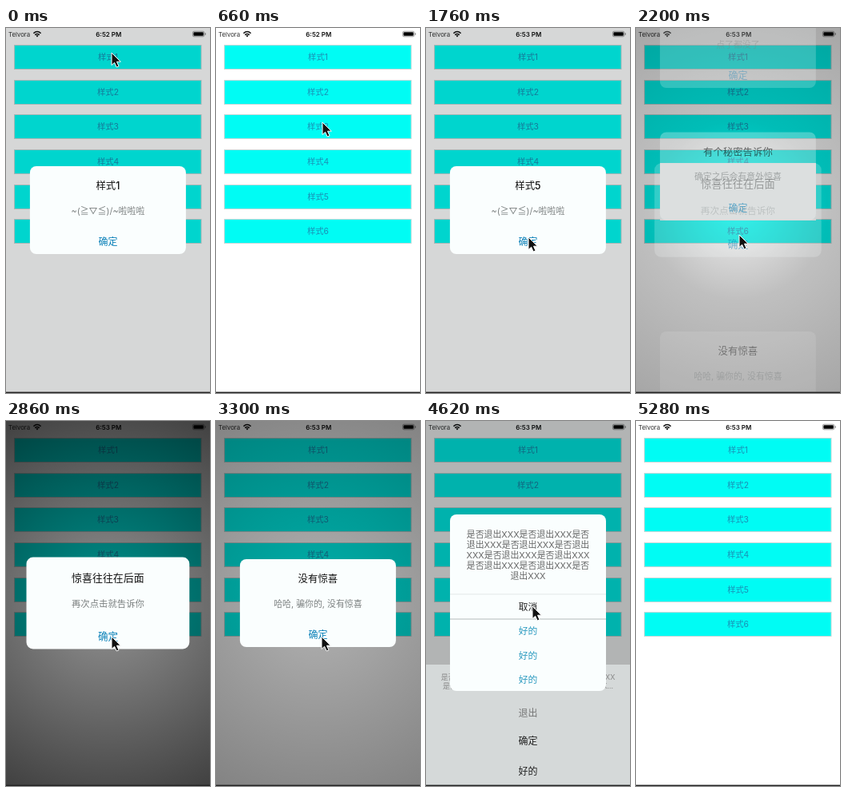
Animation of 255x457 px, one loop 5.5 s. Source, as an HTML page:

```html
<!DOCTYPE html>
<html lang="zh">
<head>
<meta charset="utf-8">
<style>
html, body { margin: 0; width: 100%; height: 100%; overflow: hidden; background: #fff; }
svg { display: block; width: 100vw; height: 100vh; font-family: Inter, "Noto Sans CJK SC", "Noto Sans CJK", sans-serif; }
</style>
</head>
<body>
<svg id="stage" viewBox="0 0 255 457"></svg>
<script>
const STEP = 220, COUNT = 25, BLUE = '#0a80b8', PANEL = '#fafefe', SHADE = '#d5d9d9';

const rect = (x, y, w, h, fill, more = '') =>
  `<rect x="${x}" y="${y}" width="${w}" height="${h}" fill="${fill}" ${more}/>`;

// y is the middle of the glyphs
const text = (s, x, y, size, fill, more = 'text-anchor="middle"') =>
  `<text x="${x}" y="${y + size * 0.38}" font-size="${size}" fill="${fill}" ${more}>${s}</text>`;

const statusBar = step =>
  text('Telvora', 3, 7.6, 7.8, '#333', '') +
  `<g fill="none" stroke="#111" stroke-width="1.4"><path d="M34.4 6.6q4.6-4 9.2 0M36.2 8.6q2.8-2.4 5.6 0"/></g>
   <path d="M37.4 9.6q1.6-1.2 3.2 0L39 11.4z"/>` +
  text(step < 8 ? '6:52 PM' : '6:53 PM', 128.3, 7.6, 8, '#111', 'text-anchor="middle" font-weight="600"') +
  rect(233.4, 4.2, 14.4, 6.6, 'none', 'rx="1.6" stroke="#777" stroke-width=".7"') +
  rect(234.4, 5.2, 12.4, 4.6, '#000', 'rx=".8"') + rect(248.6, 6.2, 1, 2.6, '#777');

function page(step) {
  let out = rect(0, 0, 255, 457, '#fff') + statusBar(step);
  for (let i = 0; i < 6; i++) {
    const y = Math.ceil(21.8 + i * 43.6);
    out += rect(10.5, y - .5, 233.5, 30, '#00fcf4', 'stroke="#c4d8d8"') +
      text('样式' + (i + 1), 127.5, y + 14.5, 10.3, '#1a8fb5');
  }
  return out;
}

const dim = a => rect(0, 0, 255, 457, '#000808', `opacity="${a}"`);

const vignette = (inner, outer, mid = inner * .6 + outer * .4) =>
  `<radialGradient id="v" gradientUnits="userSpaceOnUse" cx="127.5" cy="228" r="280">
   <stop stop-opacity="${inner}"/><stop offset=".4" stop-opacity="${mid}"/>
   <stop offset="1" stop-opacity="${outer}"/></radialGradient>` +
  rect(0, 0, 255, 457, 'url(#v)');

const alertBox = (title, msg, { y = 228, scale = 1, panel = 1, ink = 1 } = {}) =>
  `<g transform="translate(127.4 ${y}) scale(${scale})">` +
  rect(-97.5, -55, 195, 110, PANEL, `rx="8" opacity="${panel}"`) + `<g opacity="${ink}">` +
  text(title, 0, -30.6, 12.4, '#111', 'text-anchor="middle" font-weight="500"') +
  text(msg, 0, .8, 10.9, '#7c8080') + text('确定', 0, 39.6, 12, BLUE) + '</g></g>';

const ask = '是否退出XXX';

const sheet = (fill, y = 305) =>
  `<g transform="translate(0 ${y})">` + rect(0, 0, 255, 152, fill) +
  text(ask.repeat(4), 127.5, 16, 9, '#888') +
  text(ask.repeat(3) + '是否退出X…', 127.5, 26.5, 9, '#888') +
  text('退出', 127.5, 60.5, 12, '#777') + text('确定', 127.5, 95, 12, '#222') +
  text('好的', 127.5, 133, 12, '#222') + '</g>';

function choices() {
  const long = ask.repeat(10);
  let out = rect(30, 117, 195, 221, PANEL, 'rx="8"');
  [0, 16, 32, 49, 65].forEach((from, i, cuts) => {
    out += text(long.slice(from, cuts[i + 1]), 127.5, 141.6 + i * 13, 10.9, '#666');
  });
  out += rect(30, 216.6, 195, .7, '#d8dcdc') + rect(30, 247.6, 195, .8, '#a4a8a8');
  ['取消', '好的', '好的', '好的'].forEach((s, i) => {
    out += text(s, 127.5, 232.4 + i * 30.4, 11.8, i ? '#2f9cc0' : '#222');
  });
  return out;
}

const cursor = (x, y) =>
  `<path transform="translate(${x} ${y})" d="M0 0V15.5L3.6 12.3 6.2 18 9 16.8 6.5 11.2H11.3Z"
   fill="#111" stroke="#fff" stroke-width="1"/>`;

const kaomoji = '~(≧▽≦)/~啦啦啦';
const styled = (n, more) => dim(.16) + alertBox('样式' + n, kaomoji, more);
const gone = more => alertBox('提示', '点了都没了', more);
const secret = more => alertBox('有个秘密告诉你', '确定之后会有意外惊喜', more);
const behind = more => alertBox('惊喜往往在后面', '再次点击就告诉你', more);
const nothing = more => alertBox('没有惊喜', '哈哈, 骗你的, 没有惊喜', more);

// [overlay, cursor x, cursor y] for each held picture
const scenes = [
  [styled(1), 132, 31],
  [styled(1), 128, 258],
  [styled(2, { scale: 1.04 }), 132, 78],
  ['', 133, 118],
  [styled(3), 133, 122],
  [styled(4), 134, 166],
  ['', 139, 211],
  [styled(5, { scale: 1.04 }), 138, 213],
  [styled(5), 128, 262],
  [dim(.2) + gone(), 128, 259],
  [vignette(.06, .36, .25) +
    gone({ y: 20, panel: .2, ink: .36 }) +
    rect(30, 169, 195, 72, '#c4c8c8') +
    behind({ scale: 1.07, panel: .2, ink: .5 }) +
    secret({ y: 185.5, panel: .28, ink: .6 }) +
    nothing({ y: 435, panel: .1, ink: .42 }), 129, 259],
  [vignette(.25, .5) + secret(), 130, 264],
  [vignette(.34, .65) + behind({ scale: 1.1, panel: .8, ink: .8 }), 131, 268],
  [vignette(.42, .77) + behind({ scale: 1.045 }), 132, 270],
  [vignette(.3, .5) + nothing({ y: 435 }), 132, 270],
  [vignette(.3, .5) + nothing(), 132, 270],
  [dim(.2) + nothing({ panel: .5, ink: .5 }), 132, 270],
  ['', 132, 258],
  [dim(.14), 132, 270],
  [dim(.16) + sheet(PANEL), 132, 398],
  [dim(.3) + sheet(SHADE) + choices(), 132, 424],
  [dim(.3) + sheet(SHADE) + choices(), 133, 232],
  [dim(.16) + sheet(PANEL), 132, 396],
  [dim(.06) + sheet(PANEL, 410)],
  ['']
];

const stage = document.getElementById('stage');
let shown = -1;

function tick() {
  const step = Math.floor(performance.now() / STEP) % COUNT;
  if (step !== shown) {
    shown = step;
    const [overlay, x, y] = scenes[step];
    stage.innerHTML = page(step) + overlay + rect(0, 455.6, 255, 1.4, '#222') +
      (x ? cursor(x, y) : '');
  }
  requestAnimationFrame(tick);
}
tick();
</script>
</body>
</html>
```
